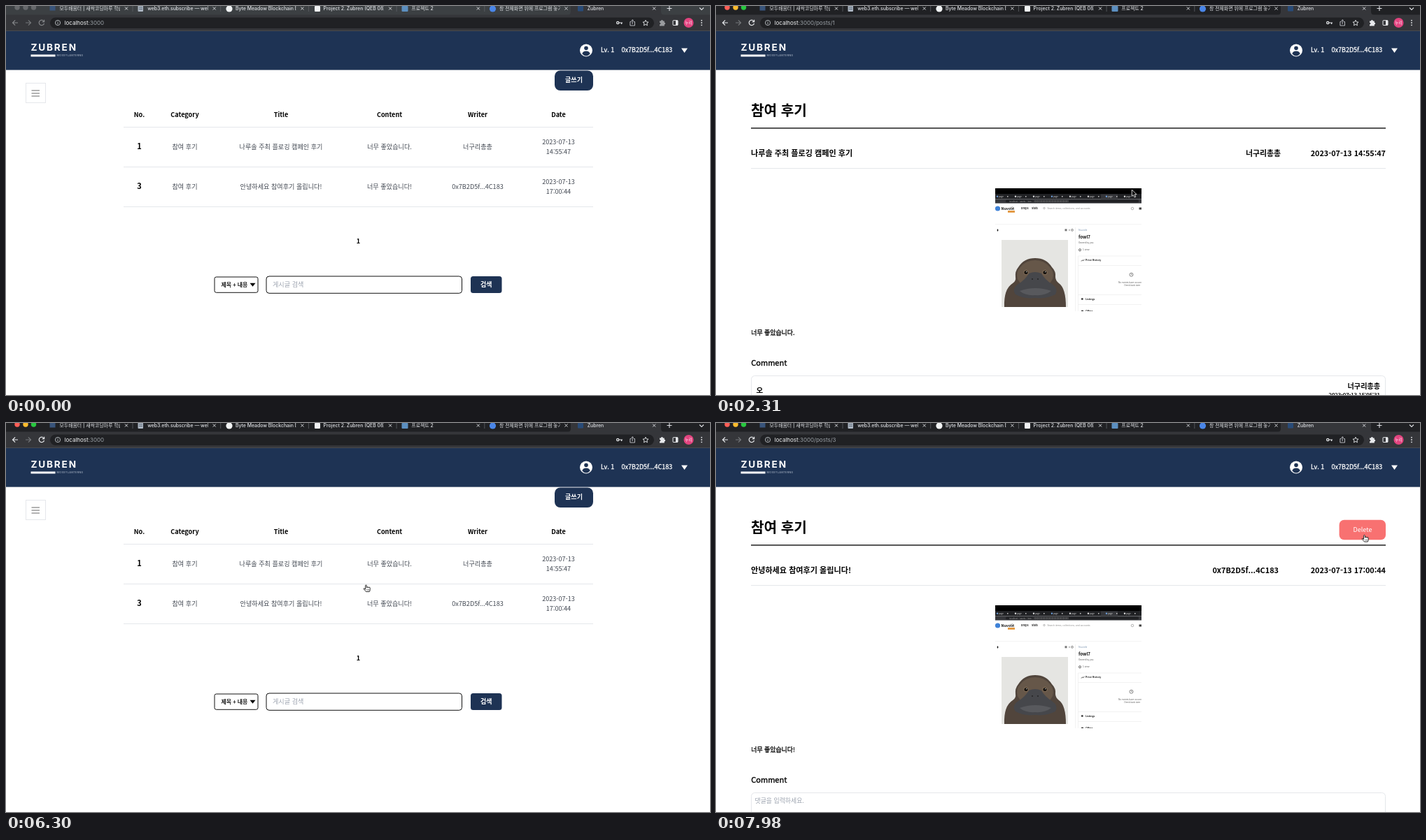
Write an HTML page that moves like this. It is 1006 by 557 pixels and loops after 8000 ms.

```html
<!DOCTYPE html>
<html lang="ko">
<head>
<meta charset="utf-8">
<title>Zubren</title>
<style>
html, body { margin: 0; width: 100%; height: 100%; overflow: hidden; background: #fff; }
svg { display: block; width: 100%; height: 100%; }
text { font-family: "Noto Sans CJK KR", "Noto Sans KR", "Noto Sans", sans-serif; white-space: pre; }
.ui text, .logo text { font-family: Inter, "Noto Sans CJK KR", sans-serif; }
</style>
</head>
<body>
<svg id="stage" viewBox="0 0 1006 557" xmlns="http://www.w3.org/2000/svg"></svg>
<script>
const NAVY = '#1e3354', LINE = '#e5e7eb', GREY = '#9ca3af', BODY = '#414751';
const STEP = 70, LOOP = 8000;
const USER = '0x7B2D5f...4C183', WRITER = '너구리총총';

const text = (x, y, str, size = 9.1, fill = '#000', weight = 400, anchor = 'start', extra = '') =>
  `<text x="${x}" y="${y}" font-size="${size}" fill="${fill}" font-weight="${weight}" text-anchor="${anchor}" ${extra}>${str}</text>`;
const mid = (x, y, str, size, fill, weight) => text(x, y, str, size, fill, weight, 'middle');
// Regular weight thickened slightly, since the Korean face has no medium
const medium = (x, y, str, size, fill = '#000', anchor = 'start') =>
  text(x, y, str, size, fill, 400, anchor, `stroke="${fill}" stroke-width="${size * .03}"`);
const rect = (x, y, w, h, fill, rx = 0, extra = '') =>
  `<rect x="${x}" y="${y}" width="${w}" height="${h}" fill="${fill}" rx="${rx}" ${extra}/>`;
const circle = (x, y, r, fill, extra = '') => `<circle cx="${x}" cy="${y}" r="${r}" fill="${fill}" ${extra}/>`;
const stroke = (d, color, w = 1, extra = '') =>
  `<path d="${d}" fill="none" stroke="${color}" stroke-width="${w}" ${extra}/>`;
const fill = (d, color) => `<path d="${d}" fill="${color}"/>`;
const group = (id, body, extra = '') => `<g id="${id}" ${extra}>${body}</g>`;

// Browser window
const tabs = [
  ['모두배움터 | 새싹코딩마루 학습', rect(62.5, 0, 8, 6.5, '#39557c')],
  ['web3.eth.subscribe — web3', rect(188.5, -1, 7.5, 9, '#aab4c0', 1) + stroke('M190 2h5M190 4.5h5', '#4b5968', .8)],
  ['Byte Meadow Blockchain Bootcamp', circle(319, 4, 4.6, '#f1f3f4')],
  ['Project 2. Zubren (QEB 08)', rect(441, 0, 8, 8, '#f1f3f4', 1)],
  ['프로젝트 2', rect(565.5, 0, 9, 8, '#5c8fc0', 1)],
  ['창 전체화면 위에 프로그램 놓기', circle(695.5, 4, 4.6, '#4a86e8')],
  ['Zubren', rect(817, 0, 8, 7.5, '#294b78', 1)]
];

function tab([title, icon], i) {
  const x = 67 + i * 125.7, close = x + 105;
  return icon +
    `<clipPath id="tab${i}"><rect x="${x}" y="0" width="96" height="12"/></clipPath>` +
    `<g clip-path="url(#tab${i})">${text(x + 9.5, 6, title, 6.9, '#dfe1e5', 500)}</g>` +
    stroke(`M${close - 2} 1.5l4 4m0 -4l-4 4`, '#d5d7da', 1) +
    (i < 5 ? stroke(`M${x + 114} 0v8`, '#5f6368', .8) : '');
}

const backArrow = 'M17 24h-7.5m3.6-3.6l-3.6 3.6l3.6 3.6';
const nextArrow = 'M28 24h7.5m-3.6-3.6l3.6 3.6l-3.6 3.6';
const reload = 'M53.8 21.6a3.7 3.7 0 1 0 .7 3.2M54.6 19.8v2.8h-2.8';
const puzzle = 'M934 21.5h2a1.4 1.4 0 0 1 2.8 0h2v2.2a1.4 1.4 0 0 1 0 2.8v2h-6.8v-2a1.4 1.4 0 0 0 0-2.8z';
const pale = '#e8eaed';

const browser = `<g class="ui">
  <rect id="strip" width="1006" height="14"/>
  ${[16, 28, 39.5].map((x, i) => circle(x, 2, 3.7, '#67696c', `id="light${i}"`)).join('')}
  ${fill('M802 13q5 0 5-5v-8h129v8q0 5 5 5z', '#35363a')}
  ${tabs.map(tab).join('')}
  ${stroke('M944.5 3.5h7M948 0v7', '#dfe1e5', 1.1)}${stroke('M991 2.5l3 3l3-3', '#dfe1e5', 1.1)}
  ${rect(0, 12.5, 1006, 23.5, '#35363a')}${rect(0, 35, 1006, 1, '#484a4f')}
  ${rect(63, 16.5, 863, 15.5, '#202124', 7.75)}
  <g id="nav" fill="none" stroke-width="1.2"><path d="${backArrow}"/><path d="${reload}"/></g>
  <path id="next" d="${nextArrow}" fill="none" stroke-width="1.2"/>
  ${circle(74, 24, 3.6, 'none', 'stroke="#bdc1c6" stroke-width=".9"')}${stroke('M74 23.4v2.6M74 21.8v.9', '#bdc1c6', .9)}
  <text x="83.5" y="27" font-size="8" fill="#f1f3f4">localhost<tspan id="url" fill="#9aa0a6"></tspan></text>
  ${circle(874.2, 24, 1.6, 'none', `stroke="${pale}" stroke-width="1.2"`)}${stroke('M876 24h5M879.6 24v2', pale, 1.2)}
  ${stroke('M893.5 22.5h-1.6v5.5h6.6v-5.5h-1.6M895.2 26v-6M893.4 21.4l1.8-1.8l1.8 1.8', '#c4c7cc', .9)}
  ${stroke('M914 20.2l1.2 2.6l2.8.3l-2.1 1.9l.6 2.8l-2.5-1.4l-2.5 1.4l.6-2.8l-2.1-1.9l2.8-.3z', pale, .9)}
  <path id="puzzle" d="${puzzle}"/>
  ${rect(953, 20.7, 7, 6.8, 'none', .6, 'stroke="#e8eaed"')}${rect(957, 20.7, 3, 6.8, pale)}
  ${circle(975.5, 24, 7, '#e2447f')}${mid(975.5, 26.2, '누리', 5.6, '#fff', 500)}
  ${[20.7, 24, 27.3].map(y => circle(994, y, .9, pale)).join('')}
</g>`;

const logo = `<g class="logo">
  ${text(35.5, 63.8, 'ZUBREN', 13.6, '#fff', 700, 'start', 'letter-spacing="1.8"')}
  ${rect(35.5, 69.5, 35, 3, '#fff')}
  ${text(72.5, 72.3, 'MOSSYLANTERNS', 3.7, '#a4afc0', 500, 'start', 'letter-spacing=".35"')}
</g>`;

const header = rect(0, 36, 1006, 55.6, NAVY) + logo +
  circle(829, 63.5, 9, '#fff') + circle(829, 60.3, 2.8, NAVY) + fill('M823.3 68.6q1-4 5.7-4t5.7 4q-2.2 2.8-5.7 2.8t-5.7-2.8z', NAVY) +
  medium(850, 66.3, 'Lv. 1', 9, '#fff') + medium(879.5, 66.3, USER, 9, '#fff') +
  fill('M965 60.5h9l-4.5 6.5z', '#fff');

// List page
const cols = [190.5, 255.5, 393, 548, 674, 789.5];
const posts = [
  { no: 1, title: '나루솔 주최 플로깅 캠페인 후기', body: '너무 좋았습니다.', writer: WRITER, time: '14:55:47' },
  { no: 3, title: '안녕하세요 참여후기 올립니다!', body: '너무 좋았습니다!', writer: USER, time: '17:00:44' }
];

function row(p, i) {
  const y = 204.5 + i * 57;
  return rect(168, 174 + i * 57, 671, 56.5, LINE, 0, `id="hover${i}"`) +
    mid(cols[0], y + .7, p.no, 11, '#000', 700) +
    ['참여 후기', p.title, p.body, p.writer].map((s, k) => mid(cols[k + 1], y, s, 9.1, BODY)).join('') +
    mid(cols[5], y - 7, '2023-07-13', 9.1, BODY) + mid(cols[5], y + 7, p.time, 9.1, BODY);
}

const list = rect(28.5, 110.5, 28, 28, '#fff', 0, `stroke="${LINE}"`) +
  stroke('M36.5 121h11.5M36.5 125h11.5M36.5 129h11.5', '#666', 1) +
  rect(784, 92.5, 55, 28.5, NAVY, 8) + mid(811.5, 109, '글쓰기', 9, '#fff', 600) +
  ['No.', 'Category', 'Title', 'Content', 'Writer', 'Date'].map((s, i) => mid(cols[i], 159, s, 9.1, '#000', 700)).join('') +
  posts.map(row).join('') +
  stroke('M168 173.5h671M168 230.5h671M168 287.5h671', LINE) +
  mid(503.5, 340, '1', 9.1, '#000', 700) +
  rect(298, 388, 62, 22.3, '#fff', 2.5, 'stroke="#111"') + medium(307.5, 401.5, '제목 + 내용', 7.9) +
  fill('M348.5 396.8h8l-4 5z', '#000') +
  rect(372, 387, 279.5, 24.3, '#fff', 4, 'stroke="#111"') + text(381, 402, '게시글 검색', 9.1, GREY) +
  rect(664, 387, 44.5, 24, NAVY, 3.5) + mid(686.2, 402, '검색', 9, '#fff', 600);

// Attached screenshot
const animal = rect(408, 335, 95, 96, '#e5e5e2') +
  fill('M412 431Q411 405 424 397Q429 394 428 388Q427 380 432 374Q440 361 456 361Q472 361 480 374Q486 380 485 388Q485 393 490 397Q500 404 500 431z', '#51453c') +
  fill('M431 391Q428 380 435 374Q443 364 456 364Q469 364 477 374Q484 380 481 391L476 399H436z', '#665749') +
  fill('M447 383Q456 379 465 383Q470 392 480 398Q490 405 485 413Q472 420 456 418Q440 420 428 413Q422 405 432 398Q442 392 447 383z', '#46474b') +
  fill('M434 408Q456 400 479 408Q470 415 456 414Q442 415 434 408z', '#58595d') +
  [443, 470].map(x => circle(x, 381.5, 3.6, '#857059') + circle(x, 381.5, 2.6, '#15120f') + circle(x + .8, 380.6, .7, '#fff')).join('') +
  circle(452, 391, .9, '#222') + circle(460, 391, .9, '#222');

const small = (x, y, s, size, color = '#222', weight = 400) => text(x, y, s, size, color, weight);
const miniTabs = [0, 1, 2, 3, 4, 5, 6, 7].map(i => {
  const x = 401 + i * 26;
  return rect(x + 15, 272, 1.5, 1.5, '#ccc') + small(x + 3, 273.8, 'page', 3, '#ddd') + circle(x + 1, 272.8, 1.2, i % 3 ? '#ddd' : '#6f9fd8');
}).join('');

const shot = rect(399, 261, 209, 176, '#fff') + rect(399, 261, 209, 8, '#000') +
  rect(399, 269, 209, 7.5, '#202124') + rect(550, 269.5, 24, 7, '#35363a') + miniTabs +
  rect(399, 276.5, 209, 6, '#35363a') + rect(414, 277.5, 190, 4, '#202124', 2) +
  small(419, 280.7, 'localhost / assets / item / 0000000000000000000000000000000', 2.9, '#aaa') +
  circle(402.5, 290, 3.6, '#3f82d8') + small(407.5, 291.8, 'Nuvolit', 5.2, '#111', 700) +
  rect(417, 293, 10, 2.8, '#e2963d') + small(436, 291.3, 'Drops', 3.6, '#222', 700) + small(451, 291.3, 'Stats', 3.6, '#222', 700) +
  circle(469, 289.5, 1.2, 'none', 'stroke="#888" stroke-width=".6"') + small(473.5, 291, 'Search items, collections, and accounts', 3.3, '#888') +
  circle(595, 290, 1.8, 'none', 'stroke="#999" stroke-width=".7"') + rect(604.5, 288.5, 3.5, 3, '#444') +
  stroke('M399 312.5h209', '#f0f0f0', .7) +
  fill('M402.5 319l1 2l-1 2l-1-2z', '#111') + rect(498.5, 319.3, 3, 3, '#777') + rect(504, 320.4, 1.8, 1, '#777') +
  circle(509, 320.8, 1.4, 'none', 'stroke="#555" stroke-width=".7"') +
  small(518, 322, 'Nuvolit', 3.6, '#7890ad') + small(518, 333, 'fowl7', 6.2, '#111', 700) +
  small(518, 340, 'Owned by you', 3.2, '#555') + circle(520, 349.3, 1.5, 'none', 'stroke="#333" stroke-width=".8"') + small(524, 350.4, '1 view', 3.2, '#555') +
  stroke('M517.5 437v-79h91M517.5 371.5h91M517.5 413.5h91M517.5 427.5h91M513.5 317v120', '#ededed', .7) +
  stroke('M522 365.5l1.5-1.7l1.2 1l1.8-2', '#222', .8) + small(528, 365.4, 'Price History', 3.5, '#222', 700) +
  circle(593.5, 384.7, 2.5, 'none', 'stroke="#555" stroke-width=".7"') + stroke('M593.5 383.2v1.6h1.2', '#555', .6) +
  small(575, 396.8, 'No events have occurred yet', 3.1, '#555') + small(583, 401, 'Check back later', 3, '#555') +
  rect(522, 418.2, 2.6, 2.6, '#333', .7) + small(528, 421, 'Listings', 3.5, '#222', 700) +
  rect(522, 435.8, 3, 2, '#333') + small(528, 437.9, 'Offers', 3.5, '#222', 700) + animal;

// Post pages
const end = (x, y, s, size, weight) => text(x, y, s, size, '#000', weight, 'end');
const postHead = (p, writerEnd) => text(50, 215, p.title, 11.1, '#000', 600) +
  end(writerEnd, 215, p.writer, 10.9, 600) + end(957, 215, '2023-07-13 ' + p.time, 10.8, 600) +
  medium(50.3, 470.5, p.body, 8.9);

const post = text(50, 156.5, '참여 후기', 20.2, '#000', 700) + rect(50, 174.2, 907, 1.4, '#111') +
  stroke('M50 232.5h907', LINE) + medium(50.3, 514.5, 'Comment', 11) +
  rect(50.5, 529.5, 906, 60, '#fff', 5, `stroke="${LINE}"`) +
  group('post0', postHead(posts[0], 807) + text(57.5, 553.5, '오', 10.5, '#000', 600) +
    end(949, 548, WRITER, 10.1, 600) + medium(949, 560.3, '2023-07-13 15:05:31', 7.9, '#000', 'end')) +
  group('post1', postHead(posts[1], 804) + text(55.5, 544.3, '댓글을 입력하세요.', 8.9, GREY) +
    rect(890.6, 138.7, 66.4, 28.6, '#f87171', 7) + mid(924, 156, 'Delete', 9.1, '#fff')) +
  group('shot', shot, 'clip-path="url(#shotBox)"');

const arrow = '<path d="M0 0V9.4L2.2 7.4L3.7 10.9L5.4 10.2L3.9 6.8H6.8Z" fill="#000" stroke="#fff" stroke-width=".8"/>';
const hand = '<path d="M-1.6 7V1a1 1 0 0 1 2 0V4a.9 .9 0 0 1 1.8 0a.9 .9 0 0 1 1.8 .3a.9 .9 0 0 1 1.8 .5V7.5Q5.8 9 4.8 10.6H-.6Q-2 8.8-4 6.6Q-4.6 5.2-3.2 5.2Z" fill="#fff" stroke="#000" stroke-width=".9" stroke-linejoin="round"/><path d="M.9 6.6v2.4M2.6 6.6v2.4M4.2 6.6v2.4" stroke="#000" stroke-width=".5"/>';

document.getElementById('stage').innerHTML =
  '<clipPath id="shotBox"><rect x="399" y="261" width="209" height="176"/></clipPath>' +
  rect(0, 0, 1006, 557, '#fff') + group('list', list) + group('post', post) + header + browser +
  group('pointer', circle(0, 0, 18, 'none', 'id="ring" stroke="#222" stroke-width="1.2"') +
    group('arrow', arrow) + group('hand', hand, 'transform="scale(.9)"'));

// Pointer path: time, x, y
const path = [
  [70, 965, 545], [350, 82, 3], [490, 82, 3], [700, 300, 120], [910, 640, 264], [1050, 640, 264], [1260, 600, 204],
  [1330, 600, 204], [1610, 667, 199], [2240, 667, 199], [2450, 449, 391], [2590, 449, 391], [2730, 427, 365],
  [2940, 700, 160], [3080, 880, 62], [3150, 931, 75], [3360, 884, 122], [3430, 880, 125],
  [3640, 830, 182], [3920, 946, 101], [4060, 905, 180], [4270, 868, 140], [4340, 914, 101], [4480, 848, 156],
  [4550, 848, 156], [4760, 396, 87], [4900, 396, 87], [4970, 343, 73], [5040, 141, 40], [5180, 141, 40],
  [5460, 82, 65], [6020, 82, 65], [6300, 515, 232], [6440, 545, 262], [6720, 529, 250], [7280, 529, 250],
  [7560, 700, 150], [7700, 850, 81], [7840, 915, 112], [7980, 927, 160.5]
];
const $ = id => document.getElementById(id);
const show = (id, on) => $(id).setAttribute('display', on ? 'inline' : 'none');
const paint = (id, attr, color) => $(id).setAttribute(attr, color);
const within = (t, ...spans) => spans.some(([a, b]) => t >= a && t < b);

function pointerAt(t) {
  const i = path.findIndex(p => p[0] >= t);
  if (i < 1) return path[0].slice(1);
  const [t0, x0, y0] = path[i - 1], [t1, x1, y1] = path[i];
  const k = (t - t0) / (t1 - t0);
  return [x0 + (x1 - x0) * k, y0 + (y1 - y0) * k];
}

function draw(now) {
  const t = Math.floor((now % LOOP) / STEP) * STEP;
  const active = t >= 980;
  const first = within(t, [1960, 5740]), second = t >= 6860;

  paint('strip', 'fill', active ? '#202124' : '#3c4043');
  ['#ff5f57', '#febc2e', '#28c840'].forEach((c, i) => paint('light' + i, 'fill', active ? c : '#67696c'));
  paint('nav', 'stroke', active ? pale : '#85878a');
  paint('next', 'stroke', active && t < 1960 ? pale : '#75777a');
  paint('puzzle', 'fill', active ? pale : '#9a9c9f');
  $('url').textContent = ':3000' + (first ? '/posts/1' : second ? '/posts/3' : '');

  show('list', !first && !second);
  show('post', first || second);
  show('post0', first);
  show('post1', second);
  show('shot', within(t, [2030, 5740], [7000, LOOP]));
  show('hover0', within(t, [1400, 1960]));
  show('hover1', within(t, [6370, 6860]));

  const [x, y] = pointerAt(t);
  const isHand = within(t, [1400, 2030], [5320, 6090], [6230, 6930], [7910, LOOP]);
  $('pointer').setAttribute('transform', `translate(${x.toFixed(1)} ${y.toFixed(1)})`);
  show('pointer', t >= 70);
  show('arrow', !isHand);
  show('hand', isHand);
  show('ring', within(t, [980, 1120], [1680, 1820], [5600, 5740], [6720, 6860]));
}

const start = performance.now();
function tick() {
  draw(performance.now() - start);
  requestAnimationFrame(tick);
}
tick();
</script>
</body>
</html>
```
